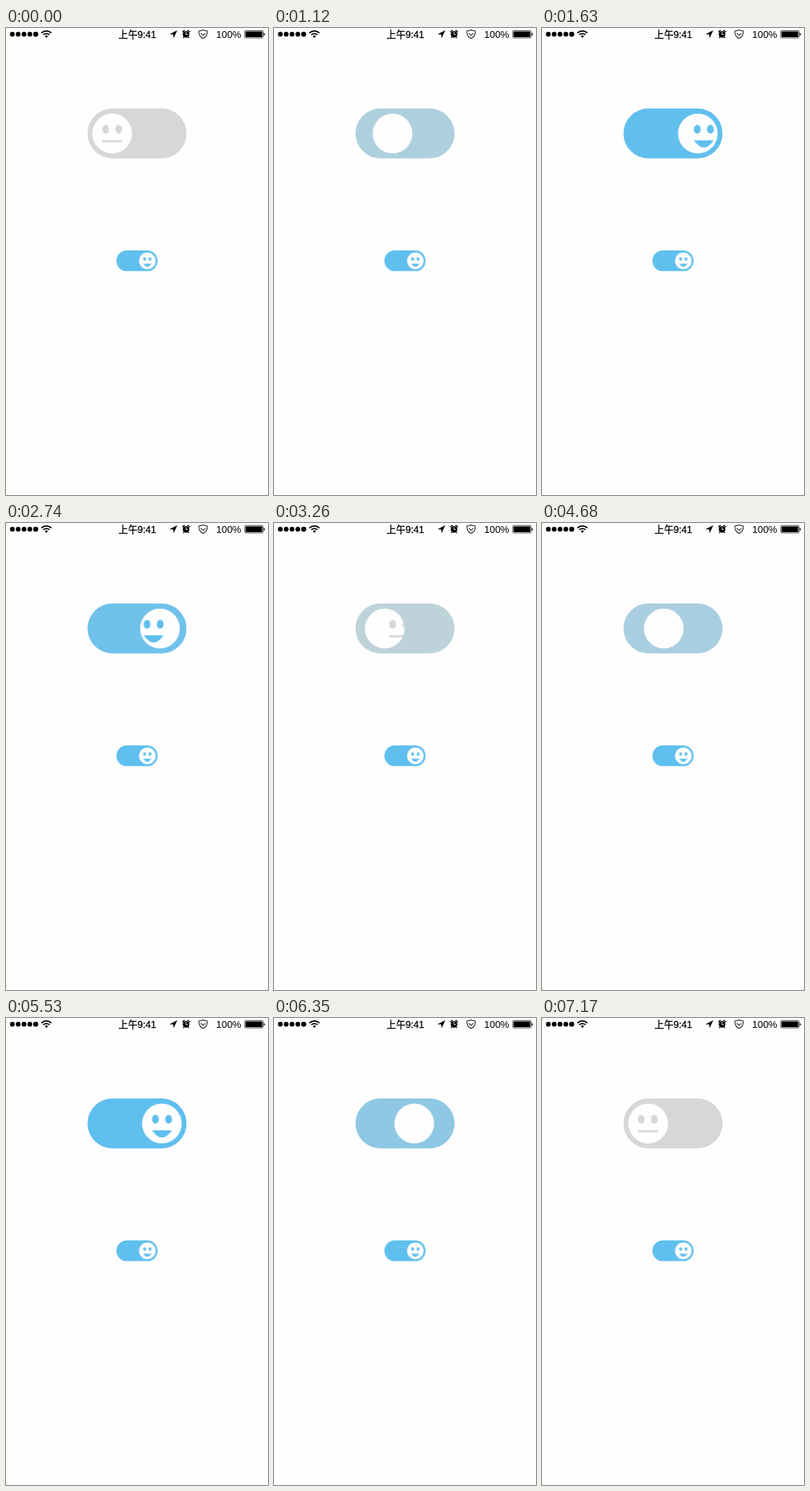
An HTML page that plays this animation: 346 by 615 pixels, repeating every 8000 ms.

```html
<!DOCTYPE html>
<html lang="zh">
<head>
<meta charset="utf-8">
<title>Face switch</title>
<style>
  :root { --on: #5fbfee; --off: #d8d7d5; --paper: #fefefe; }
  html, body { margin: 0; width: 100%; height: 100%; overflow: hidden; background: var(--paper); }
  svg { display: block; width: 100%; height: 100%; }
  text { font-family: "Liberation Sans", "Noto Sans CJK SC", "Noto Sans CJK", sans-serif; }
  .knob { fill: var(--paper); }
  .smile { fill: var(--on); }
  .flat { fill: var(--off); }

  .live * { animation: 8s infinite; }
  .live .pill { animation-name: tint; animation-timing-function: linear; }
  .live .slider { animation-name: slide; animation-timing-function: ease-in-out; }
  .live .look { animation-name: look; animation-timing-function: ease-in-out; }
  .live .smile { animation-name: glad; animation-timing-function: step-end; }
  .live .flat { animation-name: bored; animation-timing-function: step-end; }

  @keyframes tint {
    0%, 10.5625%, 42.875%, 54.625%, 85.5%, 100% { fill: var(--off); }
    20.5625%, 32.875%, 64.625%, 75.5% { fill: var(--on); }
  }
  @keyframes slide {
    0%, 10.5625%, 42.875%, 54.625%, 85.5%, 100% { transform: translateX(-32.8px); }
    20.5625%, 32.875%, 64.625%, 75.5% { transform: translateX(32.8px); }
  }
  /* glance out of the face, come in from the other side, overshoot, settle */
  @keyframes look {
    0%, 10.5625%, 25.5625%, 32.875%, 47.875%, 54.625%, 69.625%, 75.5%, 90.5%, 100% { transform: translateX(0); }
    15.5625%, 59.625% { transform: translateX(52.4px); animation-timing-function: step-end; }
    15.8125%, 59.875% { transform: translateX(-52.4px); }
    20.8125%, 21.0625%, 64.875%, 65.125% { transform: translateX(8.7px); }
    37.875%, 80.5% { transform: translateX(-52.4px); animation-timing-function: step-end; }
    38.125%, 80.75% { transform: translateX(52.4px); }
    43.125%, 43.375%, 85.75%, 86% { transform: translateX(-8.7px); }
  }
  @keyframes glad {
    0%, 38.125%, 80.75%, 100% { visibility: hidden; }
    15.8125%, 59.875% { visibility: visible; }
  }
  @keyframes bored {
    0%, 38.125%, 80.75%, 100% { visibility: visible; }
    15.8125%, 59.875% { visibility: hidden; }
  }
</style>
</head>
<body>
<svg viewBox="0 0 346 615">
  <defs>
    <clipPath id="face"><circle r="26.2"/></clipPath>
    <g id="eyes">
      <ellipse cx="-8.7" cy="-5.6" rx="4.5" ry="5.9"/>
      <ellipse cx="8.7" cy="-5.6" rx="4.5" ry="5.9"/>
    </g>
    <path id="grin" d="M-13.1 9Q0 28 13.1 9z"/>
  </defs>

  <!-- status bar -->
  <g>
    <path d="M8.4 8.2H39.3" stroke="#000" stroke-width="6.3" stroke-linecap="round" stroke-dasharray="0 7.7"/>
    <circle cx="39.2" cy="8.2" r="3.15"/>
    <g fill="none" stroke="#000" stroke-width="1.7">
      <path d="M46.7 6.6A9.4 9.4 0 0 1 60 6.6"/>
      <path d="M49.2 9A5.9 5.9 0 0 1 57.5 9"/>
    </g>
    <path d="M53.35 13L51.2 10.8A3.1 3.1 0 0 1 55.5 10.8z"/>
    <text x="148.6" y="12.8" font-size="12.6" stroke="#000" stroke-width=".3">上午9:41</text>
    <path d="M226.2 3L215.8 8.2L220.9 8.5L221.3 13.4z"/>
    <g fill="none" stroke="#000" stroke-linecap="round">
      <circle cx="237.8" cy="8.3" r="4.4" fill="#000" stroke="none"/>
      <path d="M233.3 5.2A6 6 0 0 1 235.5 3.2M240.1 3.2A6 6 0 0 1 242.3 5.2" stroke-width="1.4"/>
      <path d="M234.9 11.8L234.2 12.8M240.7 11.8L241.4 12.8" stroke-width="1.2"/>
      <path d="M237.8 5.6V8.5H239.8" stroke="#fefefe" stroke-width=".9"/>
    </g>
    <g fill="none" stroke="#222" stroke-width="1.1" stroke-linejoin="round">
      <path d="M260.3 2.4Q263 3.9 265.7 3.8Q266.6 10.5 260.3 13.7Q254 10.5 254.9 3.8Q257.6 3.9 260.3 2.4z"/>
      <path d="M257.2 6.8L260.3 9.6L263.4 6.8"/>
    </g>
    <text x="277.6" y="12.9" font-size="12.9">100%</text>
    <rect x="315.3" y="3.3" width="24.2" height="9.8" rx="1.4" fill="none" stroke="#000" stroke-width=".7"/>
    <rect x="316.4" y="4.4" width="22" height="7.6" rx=".5"/>
    <path d="M340.5 6.4Q342 6.8 342 8.2Q342 9.6 340.5 10z"/>
  </g>

  <g class="live" transform="translate(173 138.9)">
    <rect class="pill" x="-65.4" y="-32.8" width="130.8" height="65.6" rx="32.8" fill="#d8d7d5"/>
    <g class="slider">
      <circle class="knob" r="26.2"/>
      <g clip-path="url(#face)">
        <g class="look">
          <g class="flat">
            <use href="#eyes"/>
            <rect x="-13.2" y="8.8" width="26.4" height="2.9"/>
          </g>
          <g class="smile"><use href="#eyes"/><use href="#grin"/></g>
        </g>
      </g>
    </g>
  </g>

  <g transform="translate(173 306.6) scale(.416)">
    <rect x="-65.4" y="-32.8" width="130.8" height="65.6" rx="32.8" fill="#5fbfee"/>
    <g transform="translate(32.8 0)">
      <circle class="knob" r="26.2"/>
      <g class="smile"><use href="#eyes"/><use href="#grin"/></g>
    </g>
  </g>
</svg>
</body>
</html>
```
